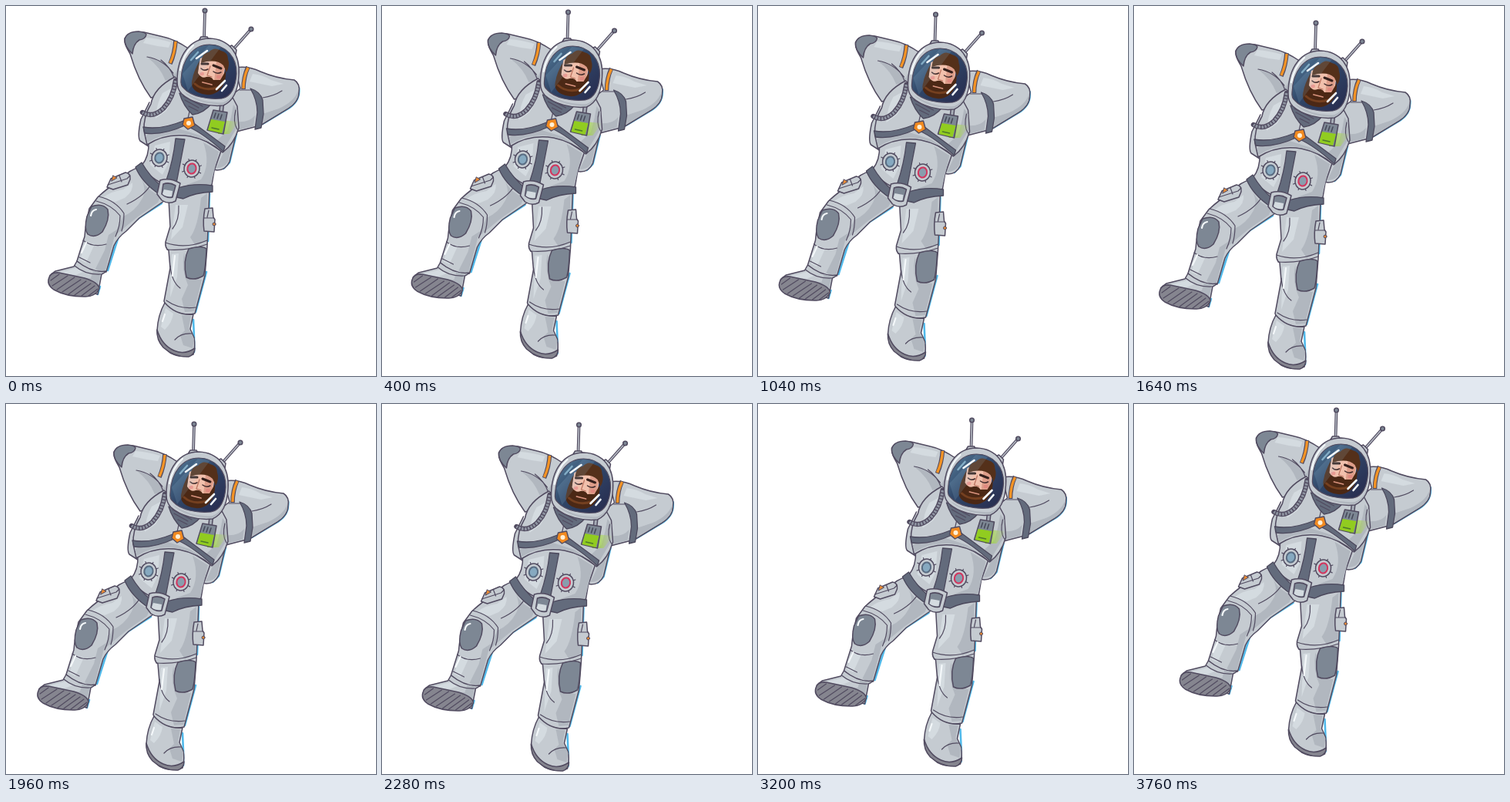
An HTML page for the animation above (4.8 s loop, 480 px wide and 480 px high).

```html
<!DOCTYPE html>
<html lang="en">
<head>
<meta charset="utf-8">
<title>Floating astronaut</title>
<style>
html, body { margin: 0; width: 100%; height: 100%; overflow: hidden; background: #fff }
svg { display: block; width: 100%; height: 100% }
path, ellipse, circle { stroke-linejoin: round; stroke-linecap: round }
.suit { fill: #c5cbd1; stroke: #514b60; stroke-width: 1.5 }
.dark { fill: #636b7c; stroke: #4b485c; stroke-width: 1.3 }
.pad { fill: #7d8794; stroke: #514b60; stroke-width: 1.5 }
.sole { fill: #85858f; stroke: #514b60; stroke-width: 1.5 }
.shade { fill: #b1b7bf }
.light { fill: #d4dbe0 }
.line { fill: none; stroke: #514b60; stroke-width: 1.2 }
.shine { fill: none; stroke: #f4f8fa; stroke-width: 2.2 }
.rim { fill: none; stroke: #50b9ea; stroke-width: 2.6 }
.band { fill: none; stroke: #514b60; stroke-width: 5.6; stroke-linecap: butt }
.orange { fill: none; stroke: #f39325; stroke-width: 3.4; stroke-linecap: butt }
</style>
</head>
<body>
<svg viewBox="0 0 480 480">
<defs>
  <linearGradient id="glass" x1="0" y1="0" x2="1" y2="1">
    <stop offset="0" stop-color="#587f9c"/><stop offset=".45" stop-color="#304769"/><stop offset="1" stop-color="#27294c"/>
  </linearGradient>
  <linearGradient id="glow">
    <stop offset="0" stop-color="#91d51c"/><stop offset="1" stop-color="#b5dd55" stop-opacity="0"/>
  </linearGradient>
  <path id="pane" d="M227 96C228 69 243 50 264 50C286 50 300 68 299 88C298 105 292 118 280 120C262 122 240 117 231 107Q226 103 227 96Z"/>
  <clipPath id="visor"><use href="#pane"/></clipPath>
</defs>
<g id="man">
  <!-- rim light -->
  <path class="rim" d="M380 106Q382 122 368 132L333 153M299 166L290 203L282 211M202 256L171 276L146 299L132 343M122 364L119 374M264 243L262 305M260 345L246 397M243 407L244 430V449"/>

  <!-- backpack -->
  <path class="suit" d="M186 125L175 147Q170 170 174 175L188 184M285 150L300 160L290 202Q285 213 274 213L262 211Z"/>
  <path class="shade" d="M287 180L297 165L288 202Q283 210 273 210Z"/>

  <!-- left arm -->
  <path class="suit" d="M238 56Q219 43 204 40L179 34Q159 32 154 42Q153 49 161 62Q171 96 188 119L220 112L225 85Z"/>
  <path class="shade" d="M184 67Q204 68 219 89L226 74L221 92L207 97Q200 79 184 67Z"/>
  <path class="light" d="M182 41Q197 42 214 47L211 54Q194 52 178 48Z"/>
  <path class="line" d="M183 66Q203 69 217 87M201 70Q213 79 218 93"/>
  <path class="pad" d="M154 43Q157 33 172 33Q181 34 182 37Q181 43 173 44Q165 49 164 62Q153 52 154 43Z"/>
  <path class="band" d="M220 45Q219 61 213 75"/><path class="orange" d="M220 46Q219 61 213 74"/>

  <!-- right arm -->
  <path class="suit" d="M297 80Q314 77 330 85Q351 94 374 96Q382 101 380 112Q380 124 366 133L330 155L299 163L287 120L304 107Z"/>
  <path class="shade" d="M379 110Q374 124 354 133L333 140L331 153L366 132Q379 124 379 110ZM298 150Q315 152 323 142L321 156L300 161Z"/>
  <path class="light" d="M320 88Q332 89 344 96L360 101L345 104L316 98Z"/>
  <path class="line" d="M333 119Q347 117 358 110M303 109L319 109"/>
  <path class="band" d="M314 79Q308 92 308 108"/><path class="orange" d="M314 80Q308 92 308 107"/>
  <path class="dark" d="M317 107Q330 111 333 122L334 140L331 158L323 160L326 138Q326 122 317 107Z"/>

  <!-- left leg -->
  <path class="suit" d="M174 209Q160 212 149 225Q133 235 119 248L108 263Q103 285 102 299L92 331Q111 348 130 345L140 311Q145 300 156 292L173 275L205 253L211 226Z"/>
  <path class="shade" d="M176 225Q184 241 201 246L197 255L170 274L141 298L129 343Q120 345 116 341L128 317L133 297L144 290L152 273Q168 266 176 251Q183 240 176 225Z"/>
  <path class="light" d="M125 249Q137 240 152 238L164 229Q166 240 154 249L142 254ZM104 306L115 309L104 333L96 329Z"/>
  <path class="line" d="M120 247Q142 252 153 269Q153 283 150 292M117 253Q137 258 148 272Q148 286 142 299M100 304Q113 314 130 309M95 326L109 333M190 228Q181 246 157 257"/>
  <path class="pad" d="M111 260Q125 255 132 264Q135 277 125 293Q115 302 106 296Q101 289 105 273Z"/>
  <path class="shine" d="M110 272Q111 265 117 264M98 320L104 307"/>
  <path class="suit" d="M136 224L155 216Q162 217 161 225L158 232L139 238L131 235Z"/>
  <path class="line" d="M132 232L157 224L161 220M147 220L150 228"/>
  <path d="M139 220L144 223L137 227Z" fill="#e78a35" stroke="#514b60"/>
  <path class="suit" d="M92 331L88 338L64 344Q54 350 56 360L119 374L124 348Q128 346 130 344Q112 347 92 331Z"/>
  <path class="shade" d="M113 343L123 346L119 364L100 354L110 353Z"/>
  <path class="light" d="M68 346L91 340L100 345L90 349Z"/>
  <path class="line" d="M89 337Q103 349 123 348"/>
  <path class="sole" d="M56 352Q58 345 69 346L102 353Q121 359 121 367Q115 378 101 377Q78 377 62 368Q52 361 56 352Z"/>
  <path class="line" d="M58 356L69 348M60 363L80 350M66 368L89 352M73 371L97 355M81 374L104 357M89 375L110 360M98 376L115 363M107 376L119 367"/>

  <!-- right leg -->
  <path class="suit" d="M211 250L213 286L207 306Q206 314 211 317L213 340L205 383L208 390Q226 403 245 399L258 350L261 312L264 236Z"/>
  <path class="shade" d="M253 249L261 243L260 305L246 311L239 300Q249 287 253 249ZM231 320L237 353L254 355L244 396L232 397L228 380L236 362Q227 342 231 320Z"/>
  <path class="light" d="M220 258L236 258L229 287L214 303ZM215 322L224 321L222 352L213 378Z"/>
  <path class="line" d="M207 307Q233 316 261 304M209 316Q235 318 261 309M208 382Q225 394 246 391M213 337Q215 358 226 366M224 259Q225 278 216 289"/>
  <path class="pad" d="M237 315Q254 310 260 315Q259 340 256 350Q244 357 234 352Q229 331 237 315Z"/>
  <path class="shine" d="M219 324L216 350"/>
  <path class="suit" d="M258 263L268 262L269 274L271 277L270 293L257 292Q255 279 258 263Z"/>
  <path class="line" d="M257 275L269 275M263 265L261 274"/>
  <circle cx="270" cy="283" r="2" fill="#e78a35" stroke="#514b60"/>
  <path class="suit" d="M206 385Q197 401 196 421Q197 438 213 450Q229 458 243 452Q246 442 244 430L239 419L243 400Q221 402 206 385Z"/>
  <path class="shade" d="M228 401L240 402L237 418L244 432L242 444L230 440L226 427L232 421Z"/>
  <path class="light" d="M207 392L217 399Q216 410 206 420L201 416Z"/>
  <path class="line" d="M219 433Q227 424 241 425"/>
  <path class="sole" d="M196 420Q202 440 218 447Q231 453 245 444Q245 452 237 455Q219 456 204 443Q195 433 196 420Z"/>
  <path class="shine" d="M203 409L206 400"/>

  <!-- belly and belt -->
  <path class="suit" d="M185 176Q186 195 176 207Q190 227 207 231L235 238Q254 239 267 232L270 214L279 188L250 169Q215 161 185 176Z"/>
  <path class="shade" d="M256 177L276 189L266 231Q248 236 234 232L253 225Q266 205 256 177Z"/>
  <path class="light" d="M193 181L213 176L211 203L203 219L187 206Z"/>
  <path class="dark" d="M220 172L232 173L221 230L208 226Q217 200 220 172Z"/>
  <path class="dark" d="M176 203L168 209Q176 229 200 245L202 234Q187 222 176 203ZM223 236Q245 229 268 233L268 241Q245 242 230 250L221 248Z"/>
  <path class="suit" d="M200 226Q213 222 226 230L220 253Q211 258 202 252L196 244Z"/>
  <path class="pad" d="M204 231Q212 228 220 233L216 248Q209 250 202 244Z"/>
  <path class="light" d="M205 238L216 240L215 247Q208 248 203 244Z"/>
  <g id="dials"></g>

  <!-- chest -->
  <path class="suit" d="M219 92Q192 106 188 127Q178 144 179 162L183 180Q208 164 239 169Q264 174 281 190Q296 179 302 158L300 130L292 115L261 126Z"/>
  <path class="shade" d="M295 128L300 135V157L282 187L270 178L287 162L292 144ZM181 168Q203 159 224 159L252 168L274 183Q253 168 228 166Q202 165 184 177Z"/>
  <path class="light" d="M214 107Q219 118 208 136L194 146Q195 127 203 113Z"/>
  <path class="dark" d="M225 113Q230 130 242 141Q257 139 267 126Z"/>
  <path class="line" d="M232 122L250 132M230 117L255 130M237 130L249 136M298 135Q294 151 300 160"/>
  <path class="dark" d="M178 157Q201 161 230 149L232 155Q204 168 180 165ZM241 150L284 182L282 189Q257 166 237 157Z"/>
  <path class="line" d="M236 146L238 137"/>
  <path d="M231 146L242 144L245 155L236 160L229 154Z" fill="#f18a20" stroke="#514b60" stroke-width="1.4"/>
  <circle cx="237" cy="152" r="3" fill="#fff0d6"/>

  <!-- hose -->
  <path d="M220 97Q217 119 204 133Q190 146 177 138" fill="none" stroke="#514b60" stroke-width="6.4"/>
  <path d="M220 97Q217 119 204 133Q190 146 177 138" fill="none" stroke="#8f95a2" stroke-width="3.8" stroke-dasharray="2.6 1.4" style="stroke-linecap:butt"/>

  <!-- chest device -->
  <path d="M278 148L302 150L290 166L275 166Z" fill="url(#glow)"/>
  <path d="M281 120L279 138" fill="none" stroke="#514b60" stroke-width="6"/>
  <path d="M281 120L279 138" fill="none" stroke="#a6acb6" stroke-width="3"/>
  <path class="pad" d="M269 135L287 138L282 166L261 161Z"/>
  <path d="M266 147L284 150L280 165L262 161Z" fill="#91cc20"/>
  <path d="M272 139L270 145M276 140L274 146M280 141L278 147" fill="none" stroke="#454858" stroke-width="1.5"/>
  <path d="M267 158L276 160" fill="none" stroke="#4e782c" stroke-width="1.5"/>

  <!-- antennas -->
  <path d="M257 42L258 8M294 57L317 31" fill="none" stroke="#514b60" stroke-width="3.8"/>
  <path d="M257 42L258 8M294 57L317 31" fill="none" stroke="#b6bbc4" stroke-width="1.6"/>
  <circle cx="258" cy="6" r="2.8" class="pad"/><circle cx="318" cy="30" r="2.8" class="pad"/>
  <path class="suit" d="M250 45L253 40H261L264 45ZM287 54L293 51L299 57L298 63Z"/>

  <!-- helmet -->
  <path class="suit" d="M222 98C222 62 240 42 264 42C290 43 304 62 302 90C301 112 293 124 282 129C262 131 240 125 228 114Q222 108 222 98Z"/>
  <path class="shade" d="M300 98Q296 120 282 125Q255 127 230 111Q246 127 281 128Q297 121 300 98Z"/>
  <path class="shine" d="M226 83Q230 62 243 51"/>
  <use href="#pane" fill="url(#glass)"/>
  <g clip-path="url(#visor)">
    <path d="M252 68Q268 60 285 74L282 94L270 107L246 100Z" fill="#f1c0ac"/>
    <path d="M273 72L284 76L280 97L270 98Z" fill="#dd9d89"/>
    <path d="M253 74Q254 61 263 60Q270 52 279 58Q288 60 288 69Q291 77 286 86L282 77Q272 68 253 74Z" fill="#54301a"/>
    <path d="M251 71L249 87Q254 95 260 92Q266 91 269 96L278 96L285 84Q286 102 275 111Q263 119 249 112Q238 106 242 94Q243 86 251 71Z" fill="#4b2815"/>
    <path d="M245 101Q256 111 274 106" fill="none" stroke="#754020" stroke-width="3"/>
    <path d="M255 99L267 102" fill="none" stroke="#d9937e" stroke-width="1.8"/>
    <path d="M254 75L262 75M269 77L279 81" fill="none" stroke="#35201c" stroke-width="3"/>
    <path d="M253 81Q257 85 262 82M269 85Q274 89 279 86" fill="none" stroke="#442e2e" stroke-width="1.5"/>
    <path d="M265 78L261 90L267 92" fill="none" stroke="#bd7663" stroke-width="1.3"/>
    <ellipse cx="254" cy="88" rx="3" ry="2.3" fill="#e99b93"/><ellipse cx="276" cy="92" rx="3" ry="2.3" fill="#e08a80"/>
    <path d="M229 88L263 51L279 53L236 110Z" fill="#a9d6eb" opacity=".14"/>
    <path d="M247 68L261 58M273 108L284 97M280 110L286 103" fill="none" stroke="#f5fbff" stroke-width="2.6"/>
    <path d="M240 70L249 60" fill="none" stroke="#83adc6" stroke-width="2.6"/>
  </g>
  <use href="#pane" class="line"/>
</g>
</svg>
<script>
const man = document.getElementById('man');

function dial(x, y, ring, core) {
  const ticks = [0, 1, 2, 3, 4, 5, 6, 7].map(i =>
    `<path class="line" transform="rotate(${i * 45 + 15})" d="M10 0H13"/>`).join('');
  return `<g transform="translate(${x} ${y}) rotate(12)">${ticks}
    <ellipse class="suit" rx="10" ry="11"/>
    <ellipse rx="5.6" ry="6.6" fill="${core}" stroke="${ring}" stroke-width="2"/></g>`;
}
document.getElementById('dials').innerHTML =
  dial(199, 197, '#596c82', '#86a9c0') + dial(241, 211, '#d4345d', '#899dad');

// time, x, y of the drift
const keys = [
  [0, 0, 0], [400, -16.5, 2], [560, -23, .2], [800, -29.5, 0], [1040, -27.5, 5],
  [1320, -26, 11], [1640, -22, 16], [1960, -14, 20], [2280, -2.5, 21], [2800, 21, 21],
  [2960, 26.5, 20], [3200, 19.5, 15], [3360, 15, 11], [3760, 4.5, 2]
];

function drift(t, axis) {
  let i = keys.findIndex(k => k[0] > t) - 1;
  if (i < 0) return keys[keys.length - 1][axis];
  const a = keys[i], b = keys[i + 1], p = keys[i - 1] || a, n = keys[i + 2] || b;
  const d = b[0] - a[0], u = (t - a[0]) / d;
  const m0 = (b[axis] - p[axis]) / (b[0] - p[0]) * d;
  const m1 = (n[axis] - a[axis]) / (n[0] - a[0]) * d;
  return a[axis] * (1 + 2 * u) * (1 - u) ** 2 + m0 * u * (1 - u) ** 2
    + b[axis] * u * u * (3 - 2 * u) + m1 * u * u * (u - 1);
}

function draw() {
  const t = Math.min(Math.floor(performance.now() % 4800 / 40) * 40, 3760);
  man.setAttribute('transform', `translate(${drift(t, 1)} ${drift(t, 2)})`);
  requestAnimationFrame(draw);
}
draw();
</script>
</body>
</html>
```
